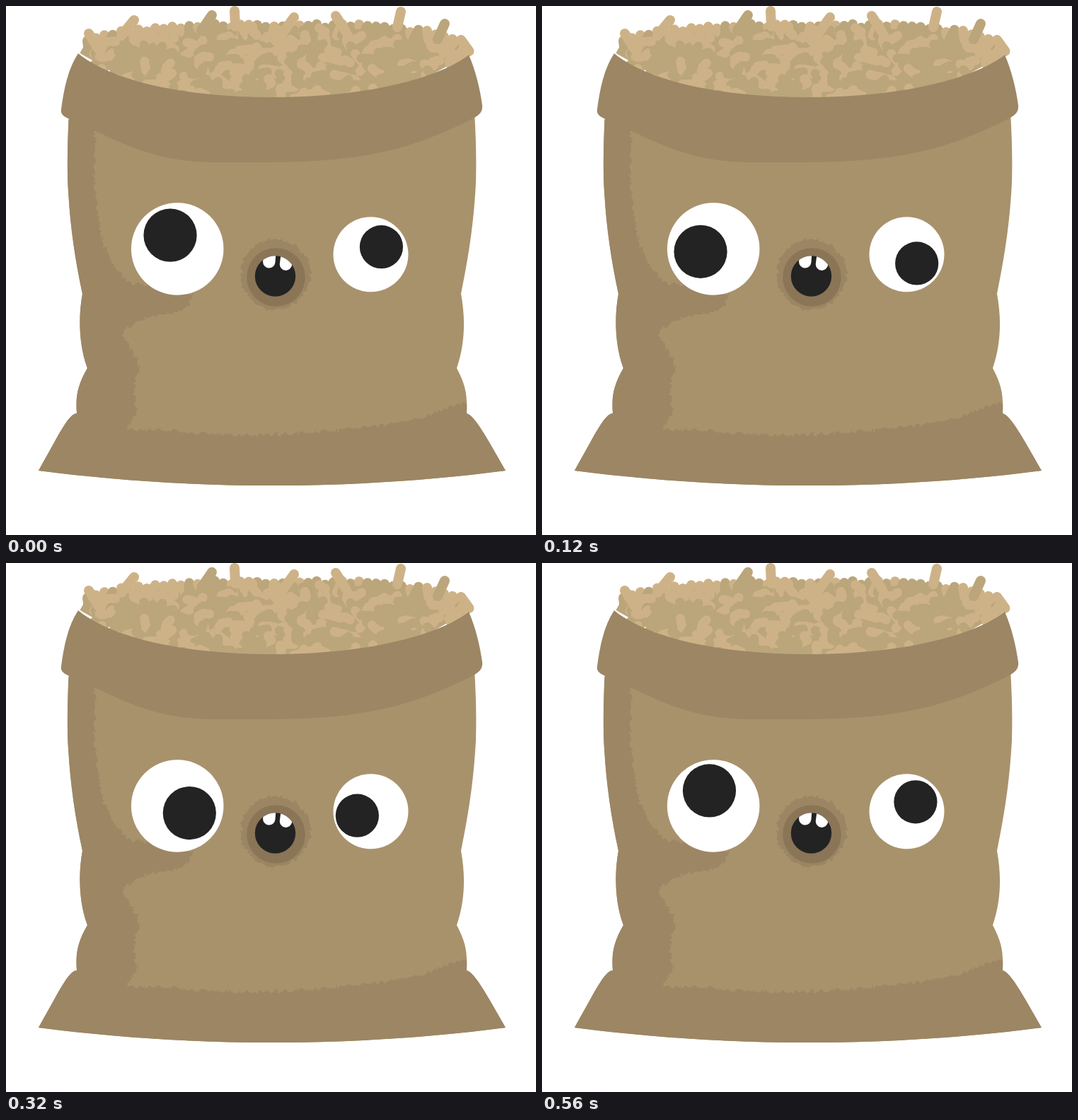
An HTML page that plays this animation: 749x748 px, repeating every 0.6 s.

```html
<!DOCTYPE html>
<html lang="en">
<head>
<meta charset="utf-8">
<title>Sack</title>
<style>
  html, body { margin: 0; width: 100%; height: 100%; overflow: hidden; background: #fff; }
  svg { display: block; width: 100vw; height: 100vh; }
</style>
</head>
<body>
<svg viewBox="0 0 749 748" preserveAspectRatio="none">
  <defs>
    <path id="sack" d="M89 150 C87 190 86 235 88 262 C91 315 98 360 108 407
      C102 440 103 480 115 512 C102 535 98 550 100 576 C88 577 76 604 46 657
      C155 671 265 678 376 678 C490 678 597 671 706 657
      C678 608 663 580 651 576 C652 550 650 537 637 512
      C648 480 650 445 643 407 C653 358 661 310 664 250 C665 215 664 185 662 150 Z"/>
    <clipPath id="inSack"><use href="#sack"/></clipPath>
    <clipPath id="inMouth"><circle cx="380.5" cy="382" r="28.7"/></clipPath>
  </defs>

  <use href="#sack" fill="#a8926c"/>
  <g clip-path="url(#inSack)">
    <path class="rough" fill="#9c8664" d="M20 150 L60 150 L127 172 C124 215 122 260 131 305
      C138 345 155 385 185 393 L262 407 C264 425 250 432 225 436 C190 440 165 455 166 466
      C170 480 190 500 190 514 C182 530 178 545 186 572 L172 599
      C230 598 290 608 360 606 C460 603 570 592 600 577 L660 556 L760 556 V700 H20 Z"/>
  </g>

  <g id="heap" fill="none" stroke-linecap="round" stroke-linejoin="round"></g>

  <path fill="#9c8664" d="M102 67 C150 106 250 129 380 129 C500 129 608 105 654 69
    C664 92 670 118 673 140 C674 149 670 153 662 158 C580 200 510 221 370 221 L300 221
    C200 222 150 185 90 160 C80 156 77 152 78 146 C82 116 88 88 102 67 Z"/>

  <path class="rough" fill="#9b8562" d="M332 379.5 A49 50 0 0 1 430 379.5 A49 50 0 0 1 332 379.5 Z"/>
  <circle cx="381.5" cy="383.5" r="41.3" fill="#8a7557"/>
  <circle cx="380.5" cy="382" r="28.7" fill="#232323"/>
  <g clip-path="url(#inMouth)" stroke="#fff" stroke-width="17.4" stroke-linecap="round">
    <path d="M373 346 L371.8 361.8 M398 346 L395.5 365.2"/>
  </g>

  <circle cx="242.2" cy="343.5" r="65.3" fill="#fff"/>
  <circle cx="515.5" cy="351.3" r="53" fill="#fff"/>
  <circle id="left" r="37.6" fill="#232323"/>
  <circle id="right" r="30.6" fill="#232323"/>
</svg>
<script>
const $ = id => document.getElementById(id);
const LIGHT = '#ceb287', DARK = '#bba57b';
const LOOP = 600, STEP = 40;

let seed = 90210;
function rand(min = 0, max = 1) {
  seed = (seed * 16807) % 2147483647;
  return min + (max - min) * seed / 2147483647;
}

// Break a smooth outline into a dry-brush edge.
function roughen(path) {
  const len = path.getTotalLength();
  let d = '';
  for (let s = 0; s < len; s += 2.2) {
    const p = path.getPointAtLength(s);
    d += `${s ? 'L' : 'M'}${p.x + rand(-3, 3)} ${p.y + rand(-3, 3)}`;
  }
  path.setAttribute('d', d + 'Z');
}

function stroke(d, color, width = 14, fill = 'none') {
  const p = document.createElementNS('http://www.w3.org/2000/svg', 'path');
  p.setAttribute('d', d);
  p.setAttribute('stroke', color);
  p.setAttribute('stroke-width', width);
  p.setAttribute('fill', fill);
  $('heap').append(p);
}

const tint = () => rand() < 0.5 ? LIGHT : DARK;
const heapTop = x => 22 + 23 * ((x - 380) / 265) ** 4;

// A bent pellet with two arms.
function pellet(x, y) {
  const a = rand(0, 2 * Math.PI), b = a + rand(1.6, 3.2), l = rand(8, 14);
  const arm = t => `${x + l * Math.cos(t)} ${y + l * Math.sin(t) * 0.7}`;
  stroke(`M${arm(a)} L${x} ${y} L${arm(b)}`, tint(), 13);
}

function fillHeap() {
  let d = 'M107 66 ';
  for (let x = 116; x <= 648; x += 14) d += `L${x} ${heapTop(x) + 6} `;
  stroke(d + 'L650 68 L560 118 L380 135 L200 118 Z', DARK, 4, DARK);

  for (let x = 115; x < 648; x += 12) {
    stroke(`M${x} ${heapTop(x) + rand(3, 9)} l${rand(-12, 12)} 16`, tint());
  }
  for (let y = 40; y < 130; y += 12) {
    for (let x = 124; x < 640; x += 22) {
      const px = x + rand(-9, 9), py = y + rand(-5, 5);
      if (py > heapTop(px) + 13) pellet(px, py);
    }
  }
  // The few pellets that stick out furthest: tip and lean.
  const tips = [[117, 39, 14], [181, 20, -18], [291, 13, -15], [323, 7, 1],
    [407, 16, -16], [466, 14, 14], [558, 8, -5], [620, 25, -10], [649, 58, -18]];
  tips.forEach(([x, y, lean], i) => stroke(`M${x} ${y} l${lean} 22`, i % 5 === 2 ? DARK : LIGHT));
}

function orbit(id, cx, cy, r, deg) {
  const a = deg * Math.PI / 180;
  $(id).setAttribute('cx', cx + r * Math.cos(a));
  $(id).setAttribute('cy', cy + r * Math.sin(a));
}

// The pupils roll in opposite directions, 25 poses a second.
function draw(now) {
  const step = Math.floor((now % LOOP) / STEP);
  orbit('left', 243.4, 341, 20.3, -124 - 24.7 * step);
  orbit('right', 514.8, 351.8, 19.2, -35.5 + 24.9 * step);
}

function tick(now) {
  draw(now);
  requestAnimationFrame(tick);
}

document.querySelectorAll('.rough').forEach(roughen);
fillHeap();
draw(0);
requestAnimationFrame(tick);
</script>
</body>
</html>
```
